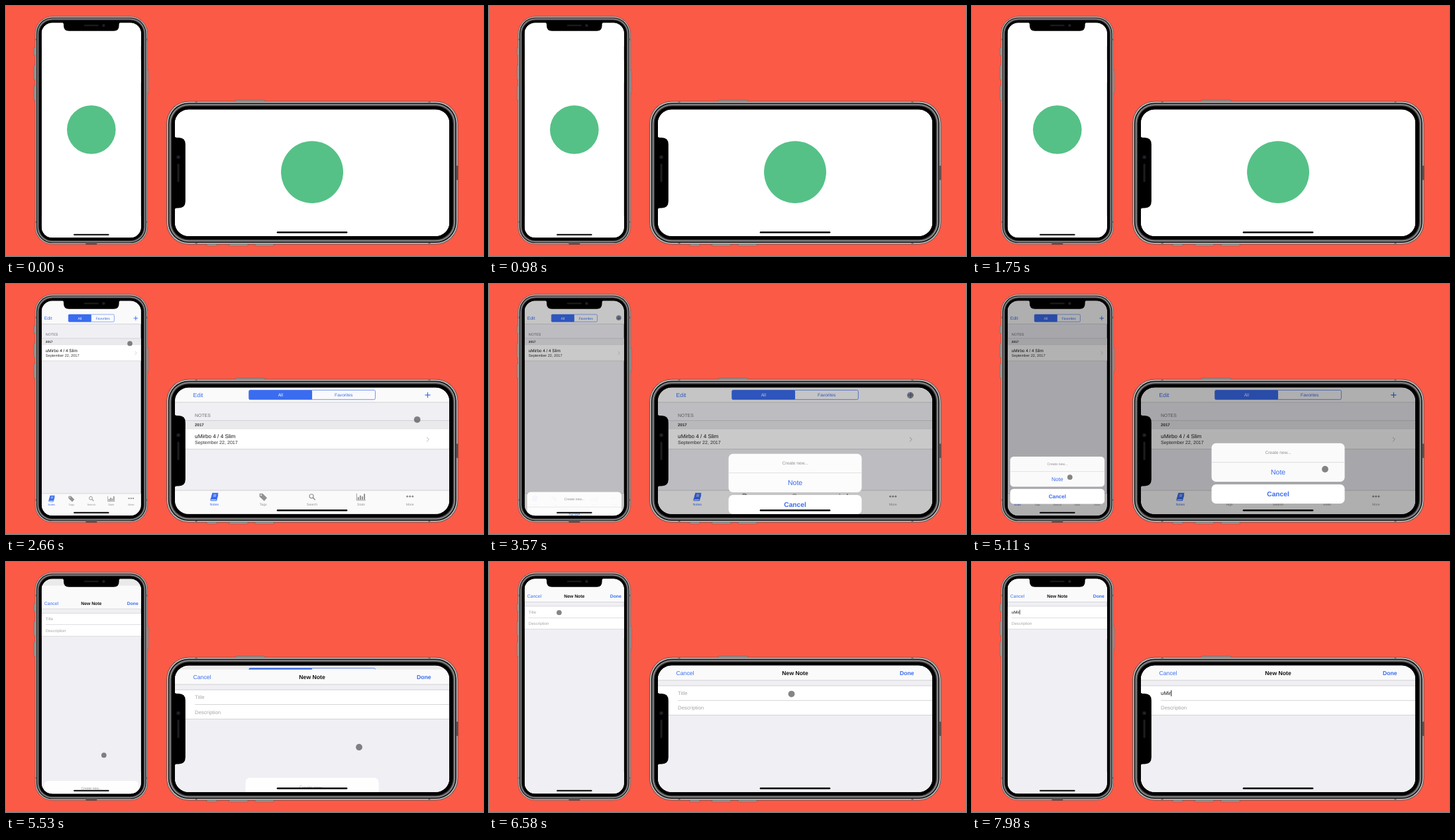
An HTML page that plays this animation: 720 px wide and 378 px high, repeating every 8000 ms.

```html
<!DOCTYPE html>
<html lang="en">
<head>
<meta charset="utf-8">
<title>Notes on two phones</title>
<style>
html, body { margin: 0; width: 100%; height: 100%; overflow: hidden; background: #fb5a47; }
svg { display: block; width: 100vw; height: 100vh; }
text { font-family: "Liberation Sans", Arial, sans-serif; text-rendering: geometricPrecision; white-space: pre; }
</style>
</head>
<body>
<svg id="stage" viewBox="0 0 720 378" xmlns="http://www.w3.org/2000/svg"></svg>
<script>
const LOOP = 8000;
const BLUE = '#3a6cf0', GREY = '#929294', LINE = '#c8c7cc', PAGE = '#efeff4', BAR = '#fafafb';
const ITEM = 'uMirbo 4 / 4 Slim';
const KEY_TIMES = [7490, 7560, 7700, 7910];
const FOCUS = 6700;
const CURSOR_TIMES = [2450, 2700, 3200, 3700, 4800, 5750, 6600];
const CURSOR_STOPS = [0, 0, 1, 1, 2, 2, 3];

// Both screens share one layout; units are device points.
const phones = [
  { id: 'p', x: 53.8, y: 25.4, k: .4, w: 375, h: 812, top: 44, side: 0, foot: 34,
    sheetW: 356, homeW: 134, sheetAt: 3497, closeAt: 5386,
    path: [[333, 161.5], [355, 64], [235, 667], [130, 127]] },
  { id: 'l', x: 255, y: 156.6, k: .51, w: 812, h: 375, top: 0, side: 44, foot: 21,
    sheetW: 394, homeW: 209, sheetAt: 3405, closeAt: 5382,
    path: [[717, 95], [747, 23], [545, 242], [395, 84]] }
];

const rect = (x, y, w, h, fill, r = 0, more = '') =>
  `<rect x="${x}" y="${y}" width="${w}" height="${h}" rx="${r}" fill="${fill}" ${more}/>`;
const hline = (x, y, w, fill = LINE) => rect(x, y - 1, w, 1.5, fill);
const stroke = (d, color, width, more = '') =>
  `<path d="${d}" fill="none" stroke="${color}" stroke-width="${width}" ${more}/>`;
// y is the middle of the capitals
const text = (x, y, size, fill, str, anchor = 'start', weight = 400, more = '') =>
  `<text x="${x}" y="${y + size * .36}" font-size="${size}" fill="${fill}" text-anchor="${anchor}" font-weight="${weight}" ${more}>${str}</text>`;

function bodyArt() {
  const shells = [[0, '#4f4a48'], [1.5, '#bdbab8'], [5, '#191919'], [8.5, '#909092'], [12, '#444446'], [15, '#000']];
  const button = (x, y, h) => rect(x, y, 7, h, '#a9a4a1', 2, 'stroke="#5a504d" stroke-width="1"');
  const bands = [60, 750].map(y => rect(-25, y, 5, 6, '#77726f') + rect(395, y, 5, 6, '#77726f')).join('');
  return button(-29, 94, 30) + button(-29, 160, 56) + button(-29, 237, 56) + button(396, 179, 87) +
    shells.map(([i, c]) => rect(-25 + i, -25 + i, 425 - 2 * i, 863 - 2 * i, c, 66 - i)).join('') +
    bands + rect(166, 834, 43, 4, '#4a4543', 2);
}

function notchArt() {
  return `<path d="M77 -2 Q83 0 83 6 V11 Q83 31 103 31 H272 Q292 31 292 11 V6 Q292 0 298 -2Z" fill="#000"/>` +
    rect(160, 7, 55, 6, '#1d1d1f', 3) +
    `<circle cx="234" cy="10" r="6" fill="#16171c"/><circle cx="234" cy="10" r="2.5" fill="#2a2d3a"/>`;
}

const icons = {
  Notes: c => `<path d="M-5 -11H11L6 7H-10Z" fill="${c}" stroke="${c}" stroke-width="2" stroke-linejoin="round"/>` +
    stroke('M-10 7Q-12 11 -8 11H6L11 -6', c, 2) + stroke('M-2 -6H6M-3 -2H5', BAR, 1.6) + stroke('M-9 8.6H5', BAR, 1),
  Tags: c => `<path d="M-10 -9H-2L10 3L3 11L-10 -1Z" fill="${c}" stroke="${c}" stroke-width="2" stroke-linejoin="round"/><circle cx="-6" cy="-5" r="2" fill="${BAR}"/>`,
  Search: c => `<circle cx="-2" cy="-2" r="6" fill="none" stroke="${c}" stroke-width="2.4"/>` + stroke('M2.5 2.5L9 9', c, 3),
  Stats: c => stroke('M-13 -10V10H14', c, 1.8) + stroke('M-8 8V1M-2 8V-4M4 8V-1M10 8V-9', c, 4),
  More: c => [-8, 0, 8].map(x => `<circle cx="${x}" cy="-1" r="2.9" fill="${c}"/>`).join('')
};

function navBar(p, left, right, middle) {
  return rect(0, 0, p.w, p.top + 44, BAR) + hline(0, p.top + 44, p.w, '#c4c4c6') +
    text(p.side + 10, p.top + 22, 17, BLUE, left) + right + middle;
}

function listPage(p) {
  const { w, h, top: t, side: s } = p, mid = w / 2, left = s + 15, end = w - s - 20;
  const segW = w === 375 ? 173 : 374, segX = mid - segW / 2;
  const plus = stroke(`M${end - 8} ${t + 22}h16m-8 -8v16`, BLUE, 2.4);
  const segments = rect(segX, t + 7.5, segW, 28, BAR, 4, `stroke="${BLUE}" stroke-width="1.4"`) +
    rect(segX, t + 7.5, segW / 2, 28, BLUE, 3) +
    text(mid - segW / 4, t + 22, 13, '#fff', 'All', 'middle') +
    text(mid + segW / 4, t + 22, 13, BLUE, 'Favorites', 'middle');
  const tabTop = h - p.foot - 49, step = (w - 2 * s) / 5;
  const tabs = Object.keys(icons).map((name, i) => {
    const x = s + step * (i + .5), c = i ? GREY : BLUE;
    return `<g transform="translate(${x} ${tabTop + 19})">${icons[name](c)}</g>` +
      text(x, tabTop + 40.5, 10, c, name, 'middle');
  }).join('');
  return rect(0, 0, w, h, PAGE) + navBar(p, 'Edit', plus, segments) +
    text(left, t + 82, 13.5, '#6d6d72', 'NOTES') +
    rect(0, t + 98, w, 25, '#eaeaed') + hline(0, t + 98, w) +
    text(left, t + 110.5, 12, '#333', '2017', 'start', 700) +
    rect(0, t + 122.5, w, 60, '#fff') + hline(0, t + 122.5, w, '#dddde1') + hline(0, t + 183, w) +
    text(left, t + 144, 16, '#111', ITEM) + text(left, t + 163, 14, '#333', 'September 22, 2017') +
    stroke(`M${end - 3} ${t + 147}l6.5 6.8l-6.5 6.8`, LINE, 2) +
    rect(0, tabTop, w, 49 + p.foot, BAR) + hline(0, tabTop, w, '#c4c4c6') + tabs;
}

function formPage(p) {
  const { w, h, top: t, side: s } = p, left = s + 15;
  const hint = (y, str, more) => text(left, y, 15.3, '#a6a6aa', str, 'start', 400, more);
  return rect(0, 0, w, h, PAGE) +
    navBar(p, 'Cancel', text(w - s - 10, t + 22, 17, BLUE, 'Done', 'end', 700),
      text(w / 2, t + 22, 17, '#111', 'New Note', 'middle', 700)) +
    rect(0, t + 60, w, 87, '#fff') + hline(0, t + 60, w) +
    hline(left, t + 103.5, w - left) + hline(0, t + 147, w) +
    hint(t + 82, 'Title', `id="${p.id}-hint"`) + hint(t + 125.5, 'Description') +
    text(left, t + 82, 15.3, '#111', '', 'start', 400, `id="${p.id}-typed"`) +
    rect(left, t + 73, 2, 18, '#222', 0, `id="${p.id}-caret"`);
}

function sheetArt(p) {
  const x = (p.w - p.sheetW) / 2, y = p.h - p.foot - 189, mid = p.w / 2;
  return rect(x, y, p.sheetW, 114, '#fff', 13, 'fill-opacity=".95"') +
    hline(x, y + 57, p.sheetW, '#d6d6da') +
    text(mid, y + 28, 13, '#8e8e93', 'Create new...', 'middle') +
    text(mid, y + 85, 20.7, BLUE, 'Note', 'middle') +
    rect(x, y + 122, p.sheetW, 57, '#fff', 13) +
    text(mid, y + 151, 20, BLUE, 'Cancel', 'middle', 700);
}

function phoneArt(p) {
  const { id, w, h } = p;
  const turn = w > h ? `matrix(0 -1 1 0 0 ${h})` : '';
  return `<g transform="translate(${p.x} ${p.y}) scale(${p.k})">
    <clipPath id="${id}-clip">${rect(0, 0, w, h, '#000', 41)}</clipPath>
    <g transform="${turn}">${bodyArt()}</g>
    <g clip-path="url(#${id}-clip)">
      ${listPage(p)}
      ${rect(0, 0, w, h, '#000', 0, `id="${id}-shade"`)}
      <g id="${id}-form">${formPage(p)}</g>
      <g id="${id}-sheet">${sheetArt(p)}</g>
      <g id="${id}-splash">${rect(0, 0, w, h, '#fff')}<circle cx="${w / 2}" cy="${h / 2 - 2}" r="92" fill="#55c187"/></g>
      ${rect((w - p.homeW) / 2, h - 13.5, p.homeW, 5, '#000', 2.5)}
      <circle id="${id}-cursor" r="9.6" fill="#464648" fill-opacity=".66"/>
    </g>
    <g transform="${turn}">${notchArt()}</g>
  </g>`;
}

const clamp = v => Math.min(1, Math.max(0, v));
const smooth = v => v * v * (3 - 2 * v);

// The standard CSS "ease" curve
function ease(x) {
  const bez = (u, a, b) => 3 * u * (1 - u) ** 2 * a + 3 * u * u * (1 - u) * b + u ** 3;
  let lo = 0, hi = 1;
  for (let i = 0; i < 24; i++) {
    const u = (lo + hi) / 2;
    if (bez(u, .25, .25) < x) lo = u; else hi = u;
  }
  return bez(lo, .1, 1);
}
const tween = (t, start, length) => t <= start ? 0 : t >= start + length ? 1 : ease((t - start) / length);

function cursorAt(path, t) {
  let i = 0;
  while (i < CURSOR_TIMES.length - 2 && t > CURSOR_TIMES[i + 1]) i++;
  const u = smooth(clamp((t - CURSOR_TIMES[i]) / (CURSOR_TIMES[i + 1] - CURSOR_TIMES[i])));
  const a = path[CURSOR_STOPS[i]], b = path[CURSOR_STOPS[i + 1]];
  return a.map((v, n) => v + (b[n] - v) * u);
}

document.getElementById('stage').innerHTML = rect(0, 0, 720, 378, '#fb5a47') + phones.map(phoneArt).join('');
const parts = ['shade', 'form', 'sheet', 'splash', 'cursor', 'hint', 'typed', 'caret'];
for (const p of phones) {
  p.el = Object.fromEntries(parts.map(n => [n, document.getElementById(`${p.id}-${n}`)]));
}

function show(el, opacity) {
  el.setAttribute('opacity', opacity);
  el.setAttribute('visibility', opacity > 0 ? 'visible' : 'hidden');
}

function draw(t) {
  const typed = ITEM.slice(0, KEY_TIMES.filter(k => t >= k).length);
  const blink = (t - FOCUS) % 1000 < 520;
  for (const p of phones) {
    const { el } = p;
    show(el.splash, 1 - tween(t, 1800, 250));
    show(el.shade, .3 * (tween(t, 3405, 400) - tween(t, p.closeAt, 300)));

    const up = tween(t, p.sheetAt, 300) - tween(t, p.closeAt, 300);
    show(el.sheet, up > 0 ? 1 : 0);
    el.sheet.setAttribute('transform', `translate(0 ${(1 - up) * (p.foot + 189)})`);

    const open = tween(t, 5222, 400);
    show(el.form, open > 0 ? 1 : 0);
    el.form.setAttribute('transform', `translate(0 ${(1 - open) * p.h})`);

    el.typed.textContent = typed;
    el.hint.setAttribute('opacity', typed ? 0 : 1);
    el.caret.setAttribute('x', p.side + 15 + (typed ? el.typed.getComputedTextLength() : 0));
    el.caret.setAttribute('opacity', t >= FOCUS && (typed || blink) ? 1 : 0);

    const [x, y] = cursorAt(p.path, t);
    show(el.cursor, t >= CURSOR_TIMES[0] && t < 7420 ? 1 : 0);
    el.cursor.setAttribute('cx', x);
    el.cursor.setAttribute('cy', y);
  }
}

const began = performance.now();
function tick() {
  draw((performance.now() - began) % LOOP);
  requestAnimationFrame(tick);
}
tick();
</script>
</body>
</html>
```
